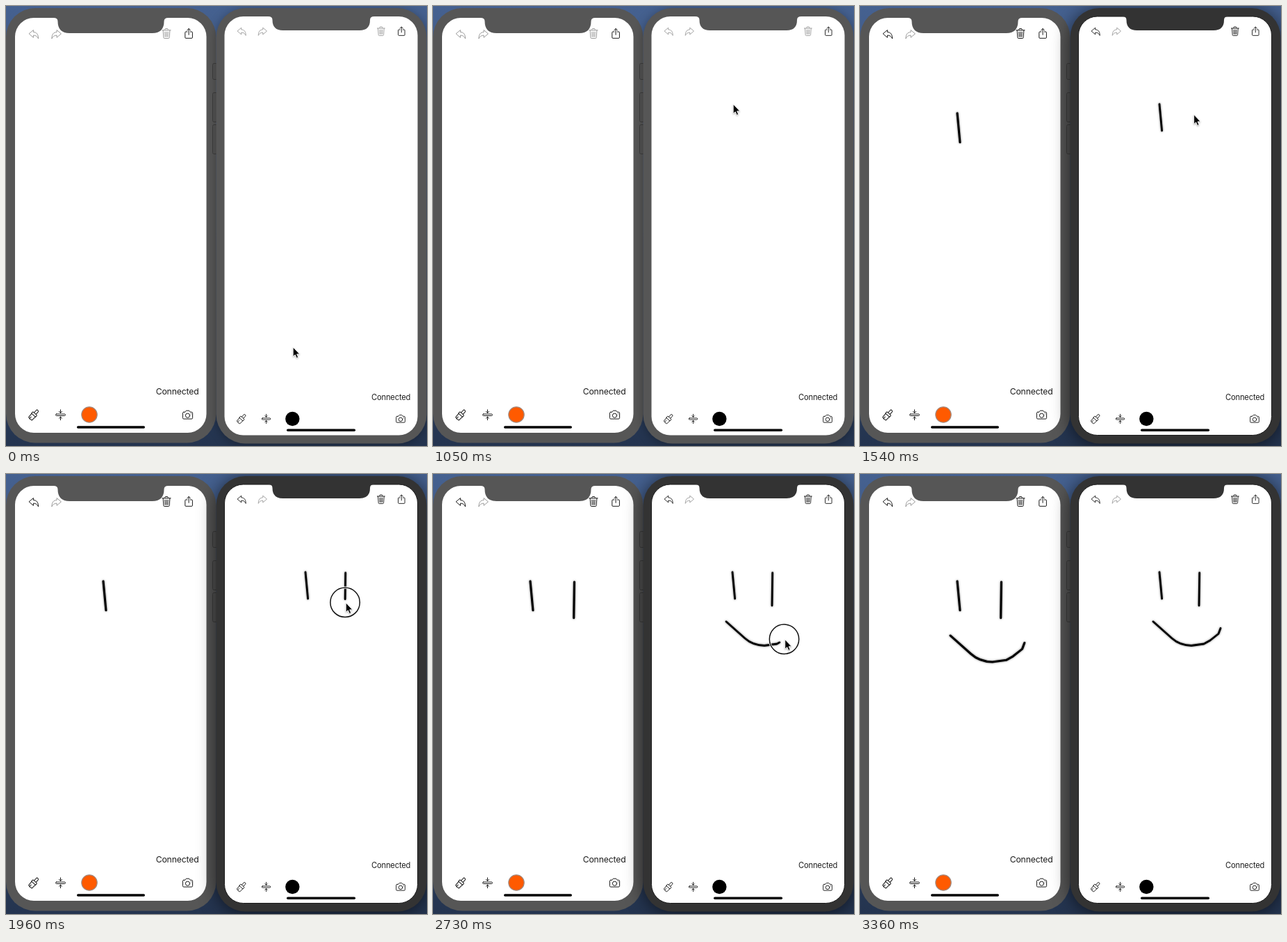
Recreate the animation shown at these times as an HTML page. Size 606 by 632 pixels, loop 3430 ms.

```html
<!DOCTYPE html>
<html lang="en">
<head>
<meta charset="utf-8">
<title>Shared drawing</title>
<style>
  html, body { margin: 0; width: 100%; height: 100%; overflow: hidden; background: #3a4d74; }
  svg { display: block; width: 606px; height: 632px; }
  text { font-family: Inter, Roboto, sans-serif; fill: #1c1c1c; text-anchor: end; letter-spacing: -.012em; }
  .line { fill: none; stroke: currentColor; stroke-width: 1; stroke-linejoin: round; stroke-linecap: round; color: #181818; }
  .dim, .edit { color: #9b9b9b; }
  .on .edit { color: #181818; }
  .ink { fill: none; stroke: #000; stroke-width: 2.8; stroke-linecap: round; stroke-linejoin: round;
         filter: drop-shadow(0 0 1.5px rgba(0, 0, 0, .55)); }
  .body { fill: #565656; }
  #right > rect.body { filter: drop-shadow(0 2px 7px rgba(0, 0, 0, .3)); }
  #right.active .body { fill: #333; }
  #right.active > rect.body { filter: drop-shadow(0 2px 13px rgba(0, 0, 0, .6)); }
  #right.active .screen { stroke: #1c1c1c; }
  #buttons { fill: #535353; stroke: #3c3c3c; }
  #cursor { fill: #000; stroke: #fff; stroke-width: .9; filter: drop-shadow(0 1px 1px rgba(0, 0, 0, .3)); }
</style>
</head>
<body>
<svg viewBox="0 0 606 632">
  <defs>
    <linearGradient id="sky" x2="0" y2="1">
      <stop offset="0" stop-color="#456190"/>
      <stop offset="1" stop-color="#24344f"/>
    </linearGradient>
    <path id="undo" d="M.4 5.3 6.4.2V3.2C11 3.2 13.6 6.5 13.6 12.6 12 9.4 10 7.8 6.4 7.8V10.6Z"/>
    <path id="trash" d="M.4 2.8H12.6M4.3 2.6V1.4Q4.3.5 5.2.5H7.8Q8.7.5 8.7 1.4V2.6M1.6 3 2.4 13.3Q2.5 14.5 3.7 14.5H9.3Q10.5 14.5 10.6 13.3L11.4 3M4.3 5.2 4.6 12.2M6.5 5.2V12.2M8.7 5.2 8.4 12.2"/>
    <path id="share" d="M3.8 5H1.9Q.8 5 .8 6.1V13.2Q.8 14.3 1.9 14.3H10.3Q11.4 14.3 11.4 13.2V6.1Q11.4 5 10.3 5H8.4M6.1 9.3V.7M3.6 3 6.1.5 8.6 3"/>
    <path id="brush" transform="rotate(42)" d="M-1.8-2.6V-7.2Q-1.8-8.8 0-8.8T1.8-7.2V-2.6M-4 .6V-1.4Q-4-2.6-2.8-2.6H2.8Q4-2.6 4-1.4V.6ZM-3.6.6-3.2 7.4 0 8.2 3.2 7.4 3.6.6M-1 7.6V4.6"/>
    <g id="width">
      <rect x="-7" y="-1.2" width="14" height="2.4" rx="1.2"/>
      <path d="M0-7.4V-3M-2-4.8 0-2.9 2-4.8M0 7.4V3M-2 4.8 0 2.9 2 4.8"/>
    </g>
    <g id="camera">
      <path d="M-5.6-4H-3.7L-2.6-5.7Q-2.3-6.1-1.7-6.1H1.7Q2.3-6.1 2.6-5.7L3.7-4H5.6Q7.1-4 7.1-2.5V4.3Q7.1 5.8 5.6 5.8H-5.6Q-7.1 5.8-7.1 4.3V-2.5Q-7.1-4-5.6-4Z"/>
      <circle cy=".9" r="3.1"/><path d="M4.9-1.6H5.1"/>
    </g>
  </defs>

  <rect width="606" height="632" fill="url(#sky)"/>
  <g id="left"></g>
  <g id="buttons">
    <rect x="297.5" y="82.5" width="8" height="23" rx="2"/>
    <rect x="297.5" y="124.5" width="8" height="42" rx="2"/>
    <rect x="297.5" y="170.5" width="8" height="42" rx="2"/>
  </g>
  <g id="right"></g>
  <g id="ring" fill="none">
    <circle r="21.2" stroke="#fff" stroke-width="3.2"/>
    <circle r="21.2" stroke="#111" stroke-width="1.5"/>
  </g>
  <path id="cursor" d="M0 0V13.6L3 10.9 5.1 15.6 7.4 14.6 5.4 10H9.5Z"/>
</svg>

<script>
const LOOP = 3430, STEP = 70, LAG = 25, SAG = 15;
const $ = id => document.getElementById(id);

// Right phone's coordinates; the pointer arrives, presses (down) and lifts (up).
const strokes = [
  { d: 'M431 141L434.6 179', arrive: 510, down: 1120, up: 1400 },
  { d: 'M488.7 142L488 189', arrive: 1590, down: 1750, up: 2050 },
  { d: 'M422 212L449 236Q460 246 477 246.5L495 244 504 239 516 229.5 519 221.5', arrive: 2420, down: 2420, up: 2870 }
];
const entry = { x: 412, y: 490 }, exit = { x: 504, y: 600, arrive: 3290 };

const icon = (id, x, y, s, cls = '', flip = 1) =>
  `<use href="#${id}" class="line ${cls}" transform="translate(${x} ${y}) scale(${s * flip} ${s})"/>`;
const box = (cls, x, y, w, h, r) =>
  `<rect class="${cls}" x="${x}" y="${y}" width="${w}" height="${h}" rx="${r}"/>`;
const notch = (x, y, w, h, r) =>
  `<path class="body" d="M${x - 6} ${y - 1}v1q6 0 6 5v${h - r - 5}q0 ${r} ${r} ${r}` +
  `h${w - 2 * r}q${r} 0 ${r} ${-r}v${5 + r - h}q0 -5 6 -5v-1z"/>`;
const tools = (x, y, gap, cameraX, s) =>
  icon('brush', x, y, s) + icon('width', x + gap, y, s) + icon('camera', cameraX, y, s);
const label = (x, y, size) => `<text x="${x}" y="${y}" font-size="${size}">Connected</text>`;
const inks = strokes.map(s => `<path class="ink" d="${s.d}" pathLength="1"/>`).join('');

$('left').innerHTML =
  box('body', 0, 3, 302.5, 624.5, 42) + box('screen', 13, 17, 275.5, 596, 27) + notch(74.5, 17, 153, 22, 17) +
  icon('undo', 33, 34.3, 1, 'edit') + icon('undo', 79.5, 34.3, 1, 'dim', -1) +
  icon('trash', 224.5, 32, 1, 'edit') + icon('share', 257, 32, 1) + tools(40, 587.3, 38.5, 261.5, 1) +
  `<circle cx="120" cy="587" r="11.2" fill="#ff5a00" stroke="#a08c84" stroke-width="1.2"/>` +
  box('', 102, 603.3, 98, 3.4, 1.7) + label(277.5, 558, 12.2) +
  `<g transform="translate(140 154) scale(1.1) translate(-431 -141)">${inks}</g>`;

$('right').innerHTML =
  box('body', 302.5, 3, 303, 625.5, 42) + box('screen', 314.5, 15, 278, 601.5, 27) + notch(383.5, 15, 140.5, 20, 15) +
  icon('undo', 333, 31, .9, 'edit') + icon('undo', 375.5, 31, .9, 'dim', -1) +
  icon('trash', 534, 29.5, .9, 'edit') + icon('share', 563.8, 29.5, .9) + tools(339, 593, 35.5, 568, .9) +
  `<circle cx="412.3" cy="593" r="10.2"/>` +
  box('', 404, 607.6, 99, 3.4, 1.7) + label(582.3, 566, 11.1) + inks;

document.querySelectorAll('.screen').forEach(e => e.setAttribute('fill', '#fff'));
const far = $('left').querySelectorAll('.ink'), near = $('right').querySelectorAll('.ink');
strokes.forEach((s, i) => s.sync = s.up + STEP);

const clamp = v => Math.max(0, Math.min(1, v));
const smooth = p => p * p * (3 - 2 * p);
const drawn = (s, t) => clamp((t - s.down) / (s.up - STEP - s.down));
const along = (i, p) => near[i].getPointAtLength(near[i].getTotalLength() * p);

function glide(a, b, p) {
  const k = smooth(clamp(p));
  return { x: a.x + (b.x - a.x) * k, y: a.y + (b.y - a.y) * k + SAG * Math.sin(Math.PI * k) };
}

// The pointer follows each stroke while pressed and glides in between.
function pointer(t) {
  let from = entry, left = 0;
  for (const [i, s] of strokes.entries()) {
    if (t < s.down) return glide(from, along(i, 0), (t - left) / (s.arrive - left));
    if (t < s.up) return along(i, drawn(s, t));
    from = along(i, 1);
    left = s.up;
  }
  return glide(from, exit, (t - left) / (exit.arrive - left));
}

const show = (el, on) => el.style.display = on ? '' : 'none';

function draw(t) {
  $('right').classList.toggle('active', t >= strokes[0].down);
  $('right').classList.toggle('on', t >= strokes[0].up);
  $('left').classList.toggle('on', t >= strokes[0].sync);

  strokes.forEach((s, i) => {
    const part = drawn(s, t - LAG);
    show(far[i], t >= s.sync);
    show(near[i], part > 0);
    near[i].style.strokeDasharray = part < 1 ? `${part} 2` : 'none';
  });

  const { x, y } = pointer(t);
  $('ring').setAttribute('transform', `translate(${x} ${y - .5})`);
  $('cursor').setAttribute('transform', `translate(${x + 1.2} ${y})`);
  show($('ring'), strokes.some(s => t >= s.down && t < s.up));
  show($('cursor'), t <= exit.arrive);
}

const start = performance.now();
function tick() {
  const t = (performance.now() - start) % LOOP;
  draw(Math.floor(t / STEP) * STEP);
  requestAnimationFrame(tick);
}
tick();
</script>
</body>
</html>
```
